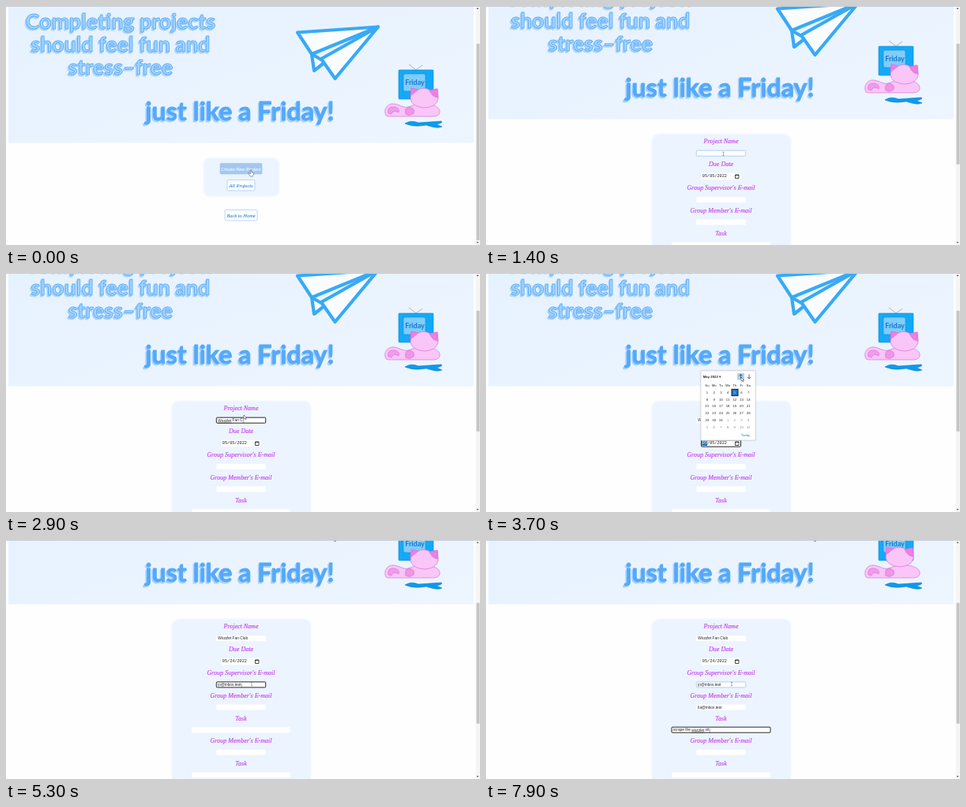
Animation, 600 px wide and 303 px high, one loop 8 s. Source, as an HTML page:

```html
<!DOCTYPE html>
<html lang="en">
<head>
<meta charset="utf-8">
<title>Project form</title>
<style>
  html, body { margin: 0; width: 100%; height: 100%; overflow: hidden; background: #fefefe; }
  svg { display: block; }
  text { text-anchor: middle; dominant-baseline: central; }
  .title { font: 700 27px Lato, sans-serif; dominant-baseline: auto; stroke-linejoin: round; }
  .label { font: italic 8px "Liberation Serif", serif; fill: #c94cf0; stroke: #c94cf0; stroke-width: .2; }
  .button { font: italic 6.4px "Liberation Serif", serif; fill: #3a86dc; stroke: #3a86dc; stroke-width: .1; }
  .button.lit { fill: #fff; stroke: #fff; }
  .field { font: 4.8px "Liberation Sans", sans-serif; fill: #222; text-anchor: start; }
  .date { font: 5.2px "Liberation Mono", monospace; fill: #222; text-anchor: start; }
  .typo { text-decoration: underline #e33 .4px; }
  #calendar { font: 4.3px "Liberation Sans", sans-serif; fill: #222; }
</style>
</head>
<body>
<svg width="600" height="303" viewBox="0 0 600 303">
  <defs>
    <linearGradient id="sky" x2="1" y2="1">
      <stop stop-color="#e5f1ff"/><stop offset="1" stop-color="#edf5ff"/>
    </linearGradient>
    <filter id="soft" x="-20%" y="-20%" width="140%" height="140%"><feGaussianBlur stdDeviation="1.2"/></filter>
  </defs>

  <g id="banner">
    <rect x="3" y="-79" width="589" height="222.500" fill="url(#sky)"/>
    <g id="titles"></g>
    <g fill="#fafdff" stroke="#38aaf6" stroke-width="4.2" stroke-linejoin="round">
      <path d="M387 31L390 52L404 41Z"/>
      <path d="M471-3.500L416.500 62L399 37Z"/>
      <path d="M369 3.500L471-3.500L387 31Z"/>
    </g>
    <g stroke="#1689d8" stroke-width=".6">
      <path d="M510 44L519 51L527 45" fill="none" stroke="#888"/>
      <rect x="497" y="51" width="44" height="37" rx="1" fill="#14a9f7"/>
      <rect x="503" y="56" width="28" height="22" rx="2" fill="#7fcdfb"/>
      <text x="517.500" y="66" style="font:700 9px Lato,sans-serif" fill="#1677cf" stroke="none">Friday</text>
    </g>
    <g fill="#f9c6f7" stroke="#d873d8" stroke-width=".7">
      <path d="M481 109C477 101 483 93 491 94C500 95 504 101 512 97C526 91 548 94 549 103Q550 109 542 110H484Z"/>
      <path d="M484 106Q482 97 492 98Q499 100 497 105Q490 101 488 107Z" fill="#f19bea"/>
      <path d="M506 107Q504 99 510 98Q518 99 516 106Q511 110 506 107Z" fill="#f095e8"/>
      <g id="head">
        <path d="M512 88L513 74L522 76Q530 72 537 77L546 75L547 88Q545 98 530 99Q514 98 512 88Z"/>
        <path d="M512 84L513 74L522 76ZM536 77L546 75L547 86Q540 86 536 77Z" fill="#ee7fe3"/>
      </g>
    </g>
    <path d="M505 119Q513 114 522 118L551 116Q554 118 545 120L552 123Q546 126 532 121Q516 124 505 119Z" fill="#0b9bf0" stroke="#0870b9" stroke-width=".5"/>
  </g>

  <g id="menu">
    <rect x="250" y="192.500" width="96" height="49" rx="8" fill="#ebf4ff" filter="url(#soft)"/>
    <g fill="#fcfeff" stroke="#a3c9f2" stroke-width=".7">
      <rect x="271" y="199.500" width="53" height="13.500" rx="1.5" fill="#a3c8f1"/>
      <rect x="280" y="220.500" width="35" height="13.500" rx="1.5"/>
      <rect x="277" y="258.500" width="41" height="13.500" rx="1.5"/>
    </g>
    <text class="button lit" x="297.500" y="206">Create New Project</text>
    <text class="button" x="297.500" y="227">All Projects</text>
    <text class="button" x="297.500" y="265">Back to Home</text>
  </g>

  <g id="form">
    <rect x="210" y="162" width="176" height="300" rx="9" fill="#ecf4ff" filter="url(#soft)"/>
    <g id="labels"></g>
    <g id="fields"></g>
  </g>
  <g id="calendar"></g>

  <rect x="594.500" width="5.500" height="303" fill="#f5f5f5"/>
  <path d="M595.5 4L597 2L598.5 4ZM595.5 299L597 301L598.5 299Z" fill="#666"/>
  <rect id="thumb" x="595.500" width="4" fill="#c5c5c5"/>
  <rect width="600" height="1" fill="#c9ced4"/>

  <g id="cursor" stroke-width=".7">
    <path id="hand" d="M-1-3Q0-4 1-3V1L4 2Q5 3 4 6L3 8H-1L-4 3L-3 2L-1 4Z" fill="#fff" stroke="#444"/>
    <path id="arrow" d="M0 0V7L1.7 5.5L3 8L4 7.5L2.9 5H5Z" fill="#fff" stroke="#333"/>
    <path id="beam" d="M-1.4-3H1.4M0-3V3M-1.4 3H1.4" fill="none" stroke="#666"/>
  </g>
</svg>

<script>
const LOOP = 8000;
const $ = id => document.getElementById(id);
const clamp = v => Math.max(0, Math.min(1, v));
const ease = (t, a, b) => { const u = clamp((t - a) / (b - a)); return u * u * (3 - 2 * u); };
const show = (id, on) => $(id).style.display = on ? '' : 'none';
const move = (id, x, y, scale = 1) => $(id).setAttribute('transform', `translate(${x} ${y}) scale(${scale})`);
const text = (s, x, y, attrs = '') => `<text x="${x}" y="${y}" ${attrs}>${s}</text>`;
const box = (x, y, w, h, attrs) => `<rect x="${x}" y="${y}" width="${w}" height="${h}" ${attrs}/>`;
const typed = (s, t, start, step) => s.slice(0, Math.max(0, Math.floor((t - start) / step) + 1));

// Each title line has a pale offset copy behind it.
const title = (s, x, y, fill, stroke, size) => {
  const style = `class="title" style="font-size:${size}px"`;
  return text(s, x - 1.6, y + 2, `${style} fill="#a9d3fd" stroke="#a9d3fd" stroke-width="1"`) +
    text(s, x, y, `${style} fill="${fill}" stroke="${stroke}" stroke-width=".9"`);
};
$('titles').innerHTML =
  [['Completing projects', -1.5], ['should feel fun and', 27.5], ['stress–free', 57]]
    .map(([s, y]) => title(s, 145, y, '#a2d5fe', '#5cabf7', 26.8)).join('') +
  title('just like a Friday!', 296, 115, '#55a9fa', '#55a9fa', 32.2);

const MEMBER = "Group Member's E-mail";
$('labels').innerHTML = [['Project Name', 171.5], ['Due Date', 200.5], ["Group Supervisor's E-mail", 230.5],
  [MEMBER, 259.5], ['Task', 288], [MEMBER, 316.5], ['Task', 345.5]]
  .map(([s, y]) => text(s, 297.5, y, 'class="label"')).join('');

function drawCalendar() {
  const col = i => 280 + i * 8.7, row = i => 151.5 + i * 8.7;
  let s = box(272, 124, 69, 88, 'fill="#999" opacity=".5" filter="url(#soft)"') +
    box(272, 124, 69, 88, 'fill="#fff" stroke="#ccc" stroke-width=".6"') +
    text('May 2022 ▾', 286, 131, 'font-weight="700"') +
    box(318, 127, 9, 8.5, 'fill="#a9d2f6"') +
    '<path d="M322.5 134V128.500M320.500 130.500L322.500 128.500L324.500 130.500M333 128.500V134M331 132L333 134L335 132" fill="none" stroke="#333" stroke-width=".7"/>' +
    box(311, 147.3, 8, 8.4, 'fill="#2378c4" stroke="#111" stroke-width=".9"');
  ['Su', 'Mo', 'Tu', 'We', 'Th', 'Fr', 'Sa'].forEach((d, i) => s += text(d, col(i), 142.5));
  for (let i = 0; i < 42; i++) {
    const fill = i > 30 ? '#888' : i === 4 ? '#fff' : '#222';
    s += text(i % 31 + 1, col(i % 7), row(Math.floor(i / 7)), `fill="${fill}"`);
  }
  $('calendar').innerHTML = s + text('Today', 328.5, 205, 'fill="#2a76c4"');
}
drawCalendar();

function drawFields(t) {
  const focus = t < 1700 ? -1 : t < 3250 ? 0 : t < 4400 ? 1 : t < 4600 ? -1 : t < 5600 ? 2 : t < 6500 ? 3 : 4;
  const hover = t > 1050 && t < 1700 ? 0 : t > 4500 ? 2 : -1;
  const values = [
    typed('Wozzlet Fan Club', t, 1850, 85),
    '',
    typed('jo@inbox.test', t, 4700, 45),
    typed('lia@inbox.test', t, 5720, 50),
    typed('scrape the wozzlet sit', t, 6760, 53), '', ''];
  const centers = [186.7, 216, 245.4, 274, 302.7, 331.3, 360];
  $('fields').innerHTML = centers.map((y, i) => {
    const wide = i === 4 || i === 6, date = i === 1;
    const x = wide ? 235 : date ? 272.5 : 266.3, w = wide ? 125 : date ? 50 : 62.4, h = date ? 8.4 : 7;
    const line = i === focus ? '#111' : i === hover ? '#a9cdf0' : 'none';
    const frame = box(x, y - h / 2, w, h, `rx="1" fill="#fff" stroke="${line}" stroke-width=".9"`);
    if (date) return frame + dateValue(t, y, focus === 1);
    let s = values[i];
    if (i === focus) s = s.replace(/wozzlet/i, '<tspan class="typo">$&</tspan>') + '<tspan>|</tspan>';
    return frame + text(s, x + (wide ? 1.5 : 2), y + .2, 'class="field"');
  }).join('');
}

function dateValue(t, y, active) {
  const month = active ? box(273.4, y - 3, 6.8, 6, 'fill="#1471c0"') : '';
  return month + text(`<tspan fill="${active ? '#fff' : '#222'}">05</tspan>/${t < 4050 ? '05' : '24'}/2022`,
    273.8, y + .2, 'class="date"') +
    `<path d="M315.500 ${y - 2}h4.500v4.500h-4.500zM315.500 ${y - 1.5}h4.500" fill="none" stroke="#222" stroke-width=".8"/>`;
}

// time, x, y of the pointer
const path = [[0, 310, 210], [500, 310, 210], [1100, 300.5, 187.5], [2600, 300.5, 187.5], [2850, 301, 180],
  [3000, 301, 180], [3230, 317, 216], [3350, 317, 216], [3620, 323, 132], [3780, 323, 132],
  [3980, 297, 176], [4200, 297, 176], [4500, 311, 182.5], [LOOP, 311, 182.5]];

function drawCursor(t) {
  const i = path.findIndex((p, k) => k && t <= p[0]);
  const [a, x, y] = path[i - 1], [b, X, Y] = path[i];
  const u = ease(t, a, b);
  move('cursor', x + (X - x) * u, y + (Y - y) * u, .75);
  const kind = t < 400 ? 'hand' : t > 1000 && t < 2700 || t > 4450 ? 'beam' : 'arrow';
  for (const id of ['hand', 'arrow', 'beam']) show(id, id === kind);
}

function draw(t) {
  const onMenu = t < 400;
  const offset = onMenu ? 30 : 83 * (1 - ease(t, 600, 880)) - 62 * ease(t, 4150, 4400);
  move('banner', 0, offset);
  move('form', 0, offset);
  show('menu', onMenu);
  show('form', !onMenu);
  show('calendar', t >= 3300 && t < 4080);
  const lift = ease(t, 5600, 6700);
  move('head', -6 * lift, -6 * lift + 3 * ease(t, 7100, 7800));
  $('thumb').setAttribute('y', onMenu ? 48 : 5 + (83 - offset) / 1.94);
  $('thumb').setAttribute('height', onMenu ? 249 : 153);
  drawFields(t);
  drawCursor(t);
}

const begin = performance.now();
function tick() {
  draw((performance.now() - begin) % LOOP);
  requestAnimationFrame(tick);
}
tick();
</script>
</body>
</html>
```
